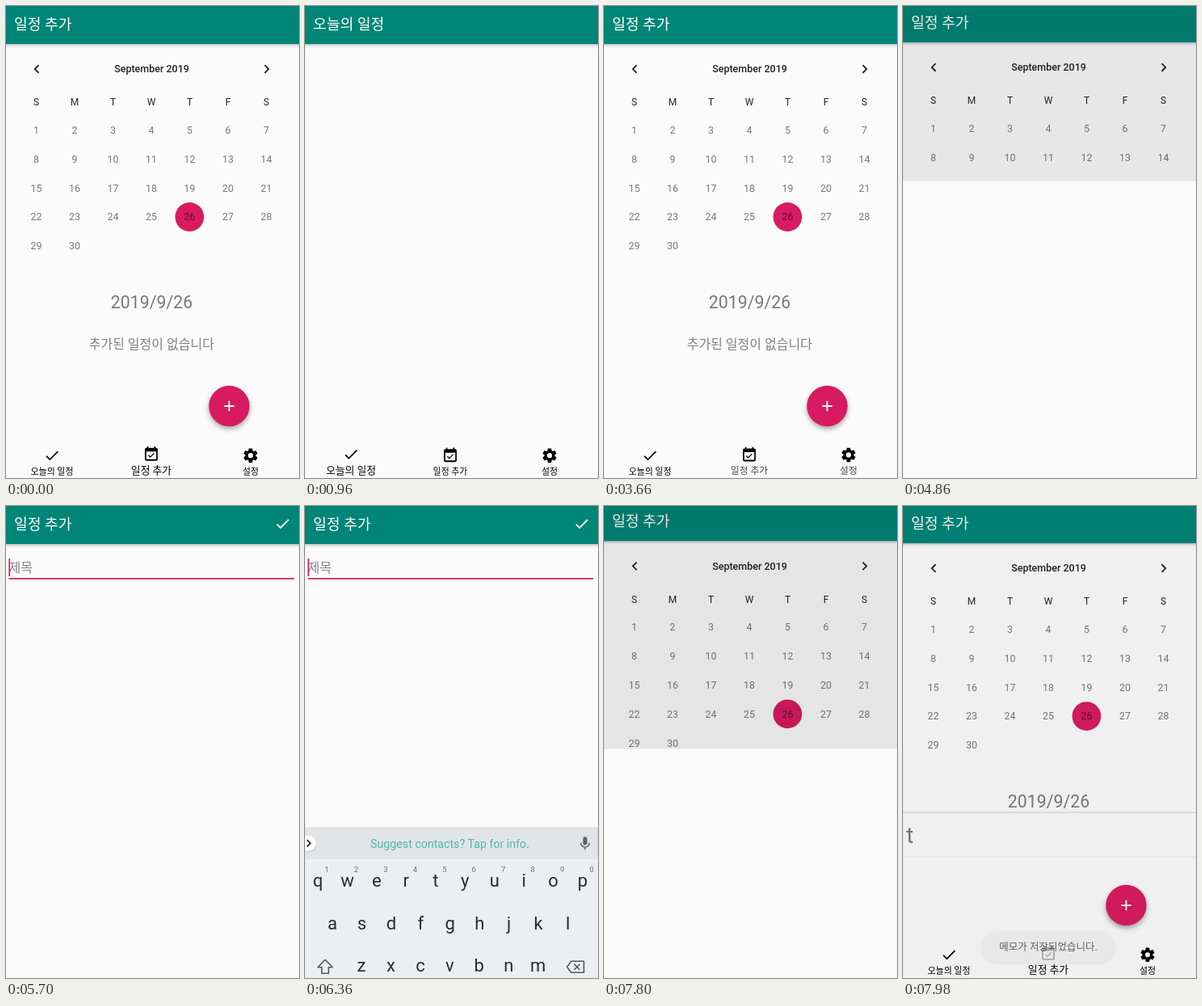
Recreate the animation shown at these times as an HTML page with a canvas. Size 363x584 px, loop 8 s.

```html
<!DOCTYPE html>
<html lang="ko">
<head>
<meta charset="utf-8">
<title>일정 추가</title>
<style>
html, body { margin: 0; width: 363px; height: 584px; overflow: hidden; background: #fbfbfb; }
canvas { display: block; width: 363px; height: 584px; }
</style>
</head>
<body>
<canvas id="stage"></canvas>
<script>
const W = 363, H = 584, LOOP = 8000, STEP = 60, DP = 0.882;
const TEAL = '#008577', PINK = '#d81b60', PAPER = '#fbfbfb', GRAY = '#787878', INK = '#1f2f37', MINT = '#4db6ac';
const FONT = 'Roboto, "Noto Sans CJK KR", "Noto Sans CJK", sans-serif';

const stage = document.getElementById('stage');
const g = stage.getContext('2d');
const dpr = window.devicePixelRatio || 1;
stage.width = W * dpr;
stage.height = H * dpr;

const clamp = v => Math.max(0, Math.min(1, v));

function text(s, x, y, size, color, align = 'center', weight = 400) {
  g.font = `${weight} ${size}px ${FONT}`;
  g.textAlign = align;
  g.fillStyle = color;
  g.fillText(s, x, y);
}

function rect(x, y, w, h, color) {
  g.fillStyle = color;
  g.fillRect(x, y, w, h);
}

function pill(x, y, w, h, r, color) {
  g.fillStyle = color;
  g.beginPath();
  g.roundRect(x, y, w, h, r);
  g.fill();
}

function disc(x, y, r, color) {
  g.fillStyle = color;
  g.beginPath();
  g.arc(x, y, r, 0, 7);
  g.fill();
}

function stroke(d, color, width) {
  g.strokeStyle = color;
  g.lineWidth = width;
  g.stroke(new Path2D(d));
}

function withShadow(blur, dy, alpha, draw) {
  g.save();
  g.shadowColor = `rgba(0,0,0,${alpha})`;
  g.shadowBlur = blur * dpr;
  g.shadowOffsetY = dy * dpr;
  draw();
  g.restore();
}

// Icons live on a 24-unit grid.
const DONE = new Path2D('M9 16.17L4.83 12l-1.42 1.41L9 19 21 7l-1.41-1.41z');
const EVENT = new Path2D('M16.53 11.06L15.47 10l-4.88 4.88-2.12-2.12-1.06 1.06L10.59 17zM19 3h-1V1h-2v2H8V1H6v2H5' +
  'c-1.1 0-2 .9-2 2V19c0 1.1.9 2 2 2h14c1.1 0 2-.9 2-2V5c0-1.1-.9-2-2-2zm0 16H5V8h14z');
const GEAR = gearPath();

function gearPath() {
  const path = new Path2D();
  const corners = [[-0.42, 7.3], [-0.24, 10.2], [0.24, 10.2], [0.42, 7.3]];
  for (let i = 0; i < 6; i++) {
    for (const [turn, r] of corners) {
      const a = i * Math.PI / 3 - Math.PI / 2 + turn;
      path.lineTo(12 + r * Math.cos(a), 12 + r * Math.sin(a));
    }
  }
  path.closePath();
  path.moveTo(15.5, 12);
  path.arc(12, 12, 3.5, 0, 7);
  return path;
}

function icon(path, x, y, color) {
  g.save();
  g.translate(x, y);
  g.scale(DP, DP);
  g.translate(-12, -12);
  g.fillStyle = color;
  g.fill(path, 'evenodd');
  g.restore();
}

function header(title) {
  rect(0, -30, W, H + 60, PAPER);
  withShadow(4, 1, 0.35, () => rect(-10, -30, W + 20, 77, TEAL));
  text(title, 10, 28.8, 18.2, '#fff', 'left');
}

const TABS = [
  { name: '오늘의 일정', icon: DONE, x: 57 },
  { name: '일정 추가', icon: EVENT, x: 180 },
  { name: '설정', icon: GEAR, x: 303 }
];
const VISITS = [[0, 1], [900, 0], [1740, 1], [2520, 2], [3660, 1]];

function nav(now, before, mix) {
  TABS.forEach((tab, i) => {
    const p = i === now ? mix : i === before ? 1 - mix : 0;
    icon(tab.icon, tab.x, 556.2 - 1.5 * p, '#000');
    text(tab.name, tab.x, 579.5 - 0.4 * p, 10.9 + 1.9 * p, p > 0 && p < 1 ? '#444' : '#000');
  });
}

function calendar() {
  stroke('M40.5 73.2L35.7 78l4.8 4.8M320.5 73.2l4.8 4.8-4.8 4.8', '#222', 1.8);
  text('September 2019', 180.5, 82.2, 12.5, '#222', 'center', 500);
  const column = i => 37.5 + 47.5 * i;
  [...'SMTWTFS'].forEach((d, i) => text(d, column(i), 123.3, 12, '#222'));
  disc(227.4, 261, 17.9, PINK);
  for (let day = 1; day <= 30; day++) {
    const i = day - 1;
    text(day, column(i % 7), 158 + 35.8 * Math.floor(i / 7), 12.4, day === 26 ? 'rgba(0,0,0,.54)' : GRAY);
  }
}

function addButton(press) {
  withShadow(6, 3, 0.35, () => disc(276.5, 495, 25.2, PINK));
  if (press) disc(276.5, 495, 25.2, `rgba(255,255,255,${press})`);
  stroke('M270.3 495h12.4M276.5 488.8v12.4', '#fff', 1.8);
}

function mainPage(t) {
  const at = VISITS.findLastIndex(v => t >= v[0]);
  const [since, tab] = VISITS[at];
  const before = at ? VISITS[at - 1][1] : -1;
  header(TABS[tab].name);
  if (tab === 1) {
    calendar();
    text('2019/9/26', 180.5, 373.8, 21.3, GRAY);
    if (t >= 7440) {
      rect(0, 379.5, W, 1, '#d0d0d0');
      text('t', 4, 418, 28, GRAY, 'left');
      rect(0, 434.5, W, 1, '#efefef');
    } else {
      text('추가된 일정이 없습니다', 180.3, 424, 16, '#808080');
    }
    addButton(t < 4560 || t > 5220 ? 0 : t < 4620 ? 0.1 : 0.18);
  }
  nav(tab, before, at ? clamp((t - since + STEP) / 120) : 1);
}

function entryPage(t) {
  const focused = t >= 5700, typed = t >= 6600;
  header('일정 추가');
  icon(DONE, 342.8, 22, '#fff');
  if (typed) {
    text('t', 3.5, 82.4, 15.9, '#666', 'left');
    if (t < 7440) rect(3.5, 84, 5, 1, '#777');
  } else {
    text('제목', 3.5, 82.4, 16, '#858585', 'left');
  }
  rect(3.5, 89, 353.5, focused ? 1.7 : 1, focused ? '#cf1f5c' : '#8a8a8a');
  const blinkOff = t >= 7080 && t < 7560;
  if (focused && !blinkOff) rect(typed ? 8.2 : 3.4, 65, 1.7, 22, PINK);
}

function keyboard(shown) {
  if (shown <= 0) return;
  g.save();
  g.translate(0, 249 * (1 - shown));
  rect(0, 335, W, 249, '#eceff1');
  rect(0, 335, W, 40, '#e1e5e7');
  withShadow(2, 0.5, 0.2, () => disc(4, 355, 10, '#fff'));
  stroke('M2.5 350.8l4.2 4.2-4.2 4.2', '#222', 1.7);
  text('Suggest contacts? Tap for info.', 179.5, 361, 14.2, MINT);

  pill(344.4, 347, 5.2, 10.2, 2.6, '#56636a');
  stroke('M341.6 354.5a5.4 5.4 0 0 0 10.8 0M347 360v3', '#56636a', 1.5);

  const row = (keys, x, y) => [...keys].forEach((k, i) => text(k, x + 36.45 * i, y, 22, INK));
  row('qwertyuiop', 16, 409);
  row('asdfghjkl', 34, 461.5);
  row('zxcvbnm', 70, 514);
  [...'1234567890'].forEach((n, i) => text(n, 27 + 36.45 * i, 391, 9.5, '#67737a'));

  g.lineJoin = 'round';
  stroke('M25 499l-9 9.5h4.7v7.5h8.6v-7.5h4.7z', '#4d5a61', 1.6);
  stroke('M330 501h15.5v14H330l-5.5-7zM333.5 504.5l7 7m0-7l-7 7', '#4d5a61', 1.6);
  g.lineJoin = 'miter';

  text('?123', 24.5, 564, 15.2, '#37474f');
  text(',', 70.5, 566, 20, INK);
  text('.', 289.5, 566, 20, INK);
  stroke('M115.5 558.5a8.5 8.5 0 1 1-17 0a8.5 8.5 0 1 1 17 0M102.8 560.5a4.6 4.6 0 0 0 8.4 0', '#4d5a61', 1.5);
  disc(104, 556, 1.3, '#4d5a61');
  disc(110, 556, 1.3, '#4d5a61');
  pill(134, 545.5, 129, 26.5, 3, '#cbd0d2');
  disc(335, 559, 16, MINT);
  stroke('M326 559h14M335.5 553.8l5.2 5.2-5.2 5.2M344 553v12', '#fff', 1.9);
  g.restore();
}

function toast(alpha) {
  if (alpha <= 0) return;
  g.save();
  g.globalAlpha = alpha;
  withShadow(3, 1, 0.12, () => pill(97, 525, 166, 40, 20, '#eeeeee'));
  text('메모가 저장되었습니다.', 180, 549.6, 12.5, '#262626');
  g.restore();
}

// Main page slides up by `lift` under a shade; the entry page covers everything below `top`.
function scene(t, lift, dim, top) {
  if (top > 0) {
    g.save();
    g.translate(0, -lift);
    mainPage(t);
    g.restore();
    if (dim > 0) rect(0, 0, W, H, `rgba(0,0,0,${dim})`);
  }
  if (top < H) {
    g.save();
    g.beginPath();
    g.rect(0, top, W, H);
    g.clip();
    g.translate(0, 0.041 * top);
    entryPage(t);
    g.restore();
  }
}

function draw(t) {
  g.setTransform(dpr, 0, 0, dpr, 0, 0);
  const opening = clamp((t - 4780) / 425);
  const closing = clamp((t - 7740) / 425);
  if (t < 4800) {
    scene(t, 0, 0, H);
  } else if (t < 7740) {
    const rest = 1 - opening;
    scene(t, 6 * (1 - rest ** 2), 0.1 * clamp(opening / 0.235), H * rest ** 4.75);
  } else {
    const rest = 1 - closing;
    scene(t, 5 * rest ** 2, 0.1 * rest, closing > 0.5 ? H : H * (1 - rest ** 4.75));
  }
  const rise = 1 - (1 - clamp((t - 6240) / 240)) ** 2;
  const fall = clamp((t - 7440) / 240) ** 2;
  keyboard(t >= 6300 ? rise - fall : 0);
  toast(clamp((t - 7860) / 170));
}

function tick() {
  const t = performance.now() % LOOP;
  draw(Math.floor(t / STEP) * STEP);
  requestAnimationFrame(tick);
}
tick();
</script>
</body>
</html>
```
